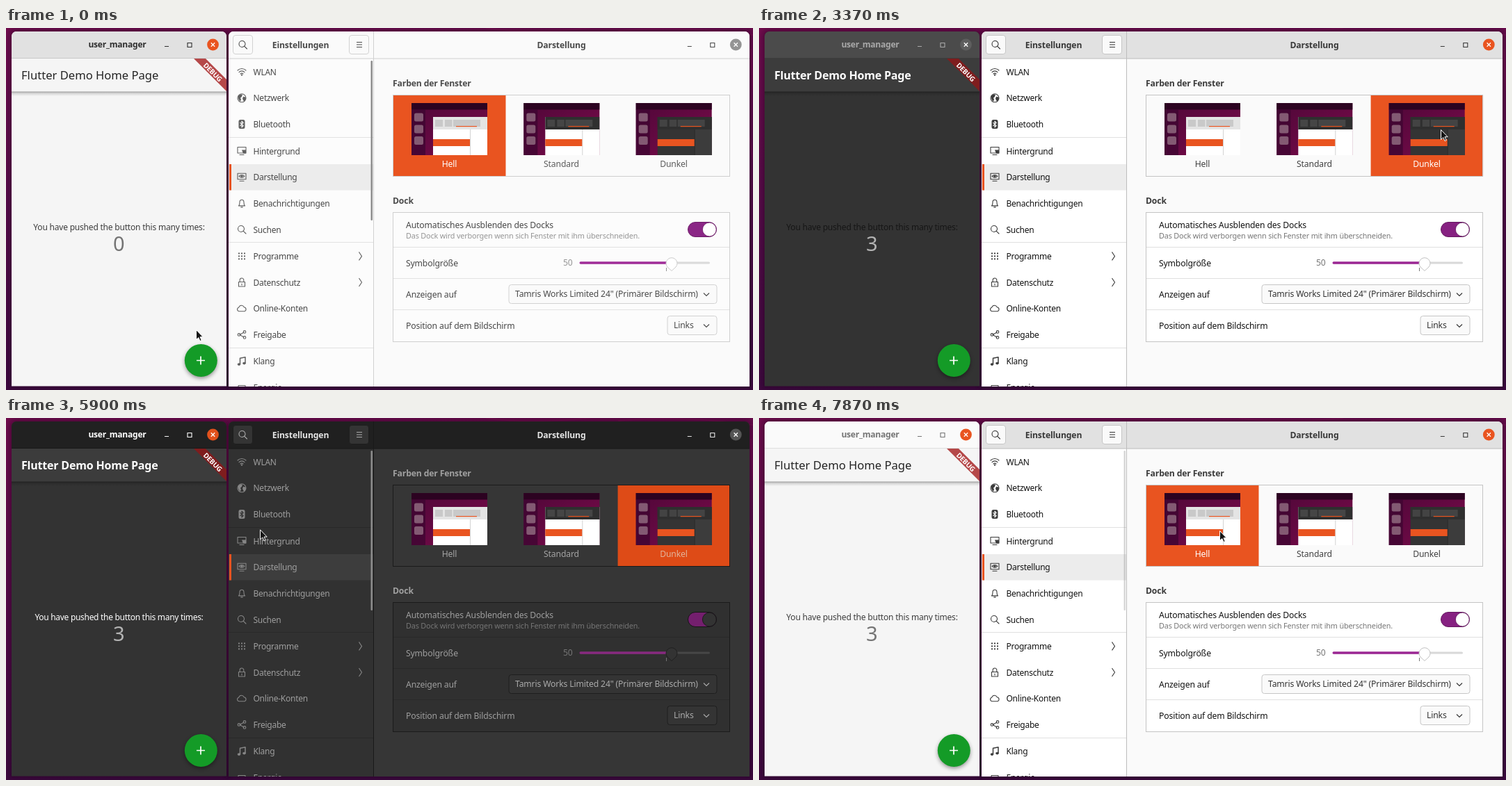
These frames come from a looping animation (1074 by 521 pixels, 8 s). An HTML page:

```html
<!DOCTYPE html>
<html lang="de">
<head>
<meta charset="utf-8">
<title>Darstellung</title>
<style>
html, body { margin: 0; width: 100%; height: 100%; overflow: hidden; background: #3f0a40; }
svg { display: block; width: 1074px; height: 521px; }
text { font: 12.2px "Noto Sans", "Open Sans", sans-serif; letter-spacing: -.15px; white-space: pre; }
.b { font-weight: 700; }
.small { font-size: 10.8px; }
.side { font-size: 12px; letter-spacing: -.25px; }
.push { font-size: 12px; letter-spacing: -.2px; }
.push.strong { font-weight: 500; letter-spacing: -.3px; }
.appL { font-size: 16.6px; font-weight: 500; letter-spacing: 0; }
.appD { font-size: 16px; font-weight: 700; letter-spacing: -.2px; }
.num { font-size: 29px; letter-spacing: 0; }
.tag { font-size: 10px; font-weight: 900; letter-spacing: -.2px; }
.mid { text-anchor: middle; }
.icon { fill: none; stroke: var(--ic); stroke-width: 1.1; stroke-linecap: round; stroke-linejoin: round; }
.icon .f { fill: var(--ic); stroke: none; }
</style>
</head>
<body>
<svg id="stage" viewBox="0 0 1074 521" xmlns="http://www.w3.org/2000/svg"></svg>
<script>
const LOOP = 8000;
const stage = document.getElementById('stage');

// ---------- drawing helpers ----------
const col = c => c.startsWith('--') ? `var(${c})` : c;
const rect = (x, y, w, h, fill, stroke, rx = 0, more = '') =>
  `<rect x="${x}" y="${y}" width="${w}" height="${h}" rx="${rx}" style="fill:${col(fill)};stroke:${col(stroke || 'none')}" ${more}/>`;
const text = (x, y, s, fill, cls = '', more = '') =>
  `<text x="${x}" y="${y}" class="${cls}" style="fill:${col(fill)}" ${more}>${s}</text>`;
const line = (d, stroke, w = 1, more = '') =>
  `<path d="${d}" style="fill:none;stroke:${col(stroke)};stroke-width:${w}" ${more}/>`;
const disc = (x, y, r, fill, more = '') =>
  `<circle cx="${x}" cy="${y}" r="${r}" style="fill:${col(fill)}" ${more}/>`;
const frame = (x, w, h) =>
  `M${x} ${5 + h}V12a7 7 0 0 1 7-7h${w - 14}a7 7 0 0 1 7 7V${5 + h}Z`;

const winButtons = (x, ink, fill) =>
  line(`M${x - 69.5} 26.5h6`, ink, 1.1) + line(`M${x - 36.5} 21.5h6v6h-6z`, ink, 1.1) +
  disc(x, 24, 8.4, fill) + line(`M${x - 2.7} 21.3l5.4 5.4m0-5.4l-5.4 5.4`, '#fff', 1.3);

// ---------- sidebar ----------
const icons = {
  wifi: '<path d="M-6-2a8.5 8.5 0 0 1 12 0M-4 .6a5.6 5.6 0 0 1 8 0M-2 3a3 3 0 0 1 4 0"/><circle class="f" cy="4.6" r="1.2"/>',
  globe: '<circle r="6"/><path class="f" d="M-5-3Q-2-6 1-5L0-2-2 0-1 2-2 5Q-6 2-5-3ZM2-2L6-1Q6 3 3 5L1 1Z"/>',
  blue: '<rect class="f" x="-4.5" y="-6.5" width="9" height="13" rx="2.5"/><path d="M-2.2-2.2l4.4 4.4L0 4.4v-8.8l2.2 2.2-4.4 4.4" style="stroke:var(--side)"/>',
  desk: '<path d="M-6-5.5H6v8.5H-6ZM-3 5.5H3"/><path class="f" d="M0-1.5h6v5H2z"/>',
  look: '<path d="M-6-5.5H6v8.5H-6ZM-3 5.5H3M-4-1.3Q0-5 4-1.3 0 2.2-4-1.3Z"/><circle class="f" cy="-1.3" r="1.5"/>',
  bell: '<path d="M-4.5 3.5Q-3 2-3-1.5a3 3.6 0 0 1 6 0Q3 2 4.5 3.5ZM-1.2 5.5h2.4"/>',
  find: '<circle cx="-1" cy="-1" r="4.5"/><path d="M2.3 2.3L6 6"/>',
  grid: [-4, 0, 4].map(y => [-4, 0, 4].map(x => `<circle class="f" cx="${x}" cy="${y}" r="1.1"/>`).join('')).join(''),
  lock: '<path d="M-4.5-.5h9v6.5h-9ZM-2.8-.5v-2.7a2.8 2.8 0 0 1 5.6 0v2.7M0 2v2"/>',
  cloud: '<path d="M-4 4a2.8 2.8 0 0 1-.3-5.5 4 4 0 0 1 7.5-.5A3.1 3.1 0 0 1 4 4Z"/>',
  share: '<path d="M-3 0L3-3.5M-3 0L3 3.5"/><circle cx="-4" r="1.8"/><circle cx="4" cy="-4" r="1.8"/><circle cx="4" cy="4" r="1.8"/>',
  note: '<path d="M-2.5 4v-8.5L5-6v8.5" stroke-width="1.5"/><ellipse class="f" cx="-4" cy="4.3" rx="2.3" ry="1.8"/><ellipse class="f" cx="3.5" cy="2.8" rx="2.3" ry="1.8"/>',
  power: '<path d="M-5-3H5v7H-5Z"/>'
};
const menu = [
  ['WLAN', 'wifi', 63], ['Netzwerk', 'globe', 100.8], ['Bluetooth', 'blue', 138.5],
  ['Hintergrund', 'desk', 177], ['Darstellung', 'look', 214.7], ['Benachrichtigungen', 'bell', 252.4],
  ['Suchen', 'find', 290], ['Programme', 'grid', 328.4], ['Datenschutz', 'lock', 366],
  ['Online-Konten', 'cloud', 403.7], ['Freigabe', 'share', 441.4], ['Klang', 'note', 479.8],
  ['Energie', 'power', 517.5]
];
const glyph = (name, x, y) => `<g class="icon" transform="translate(${x} ${y})">${icons[name]}</g>`;

const sidebar = () =>
  rect(320, 44, 208, 472, '--side') +
  rect(320, 196, 208, 37.5, '--row') + rect(321, 196, 3, 37.5, '#e95420') +
  [157.5, 308.5, 460.5].map(y => line(`M320 ${y}H528`, '--line')).join('') +
  menu.map(([s, icon, y]) => glyph(icon, 339, y) + text(355.5, y + 4.5, s, '--tx', 'side')).join('') +
  [328.4, 366].map(y => line(`M507.5 ${y - 6}l4 6-4 6`, '--ic', 1.1)).join('') +
  rect(524.5, 47, 2.5, 230, '--bar', '', 1.2, 'id="bar"');

// ---------- theme tiles ----------
function thumb(x, head, btn, body, pane, split) {
  const box = (dx, w) => rect(x + dx, 132, w, 10, btn);
  return rect(x, 108, 109, 75, 'url(#wall)') + rect(x, 108, 109, 9.5, '#2c0321') +
    rect(x, 117, 20, 66, '#3d0630', '', 0, 'opacity=".75"') +
    [122.5, 139.5, 156].map(y => rect(x + 4, y, 13, 12, '#835a73', '', 2.5)).join('') +
    rect(x + 31, 128, 78, 55, body) + rect(x + 84.5, 146, 24.5, 37, pane) +
    rect(x + 31, 128, 78, 18, head) + box(34, 11) + box(48, 10.5) + box(60, 39) +
    rect(x + 64, 141, 30, 1.2, '#e95420') +
    line(`M${x + 84.5} 146v37`, split) + rect(x + 31, 160, 53, 10, '#e95420');
}
const tiles = () =>
  rect(557, 97, 484, 116, '--main') +
  rect(557, 97, 161.5, 116, '--sel', '', 0, 'id="pick"') +
  rect(556.5, 96.5, 484, 117, 'none', '--bord') +
  thumb(583, '#e4e4e4', '#c9c9c9', '#ffffff', '#ffffff', '#d2d2d2') +
  thumb(744.3, '#2f2f2f', '#454545', '#ffffff', '#ffffff', '#d2d2d2') +
  thumb(905.7, '#2f2f2f', '#434343', '#343434', '#3c3c3c', '#2b2b2b') +
  text(637.5, 200, 'Hell', '--tile0', 'mid') + text(798.5, 200, 'Standard', '--tile1', 'mid') +
  text(960, 200, 'Dunkel', '--tile2', 'mid');

const dropDown = (x, y, w, s) =>
  rect(x + .5, y + .5, w - 1, 27, '--btn', '--btnb', 3.5) +
  text(x + 9.5, y + 18.3, s, '--btx') +
  line(`M1003 ${y + 12.5}l4 4 4-4`, '--btx', 1.1);

const dock = () =>
  rect(556.5, 265.5, 484, 186, '--card', '--bord') +
  [315.5, 360.5, 405.5].map(y => line(`M557 ${y}H1040`, '--line')).join('') +
  text(575, 288, 'Automatisches Ausblenden des Docks', '--tx') +
  text(575, 303, 'Das Dock wird verborgen wenn sich Fenster mit ihm überschneiden.', '--sub', 'small') +
  rect(980.5, 279.5, 41, 21, '--sw', '--swb', 10.5) +
  disc(1011.3, 290, 9.9, '--knob', 'stroke="var(--swb)" stroke-width=".8"') +
  text(575, 343, 'Symbolgröße', '--tx') + text(801, 342.3, '50', '--sub') +
  rect(825, 336.5, 187, 3, '--track', '', 1.5) + rect(824.5, 336.3, 132, 3.4, '--slide', '', 1.7) +
  line('M949.5 345v5', '--sub') +
  `<path d="M957 349.5l-6-5.5a8 8 0 1 1 12 0Z" style="fill:var(--grip);stroke:var(--gripb)"/>` +
  text(575, 388, 'Anzeigen auf', '--tx') +
  dropDown(722.5, 369, 300, 'Tamris Works Limited 24&quot; (Primärer Bildschirm)') +
  text(575, 433, 'Position auf dem Bildschirm', '--tx') +
  dropDown(950.5, 414, 72, 'Links');

const settings = () =>
  rect(320, 5, 749, 511, '--main') + sidebar() +
  rect(320, 5, 749, 39, '--title') + line('M320 44H1069', '--edge') + line('M528.5 5V516', '--edge') +
  rect(326.5, 10.5, 28, 27, '--btn', '--btnb', 3.5) + rect(493.5, 10.5, 28, 27, '--btn', '--btnb', 3.5) +
  `<g class="icon" style="stroke:var(--btx)" transform="translate(340.5 24)">${icons.find}</g>` +
  line('M504 20.5h8M504 24h8M504 27.5h8', '--btx', 1.1) +
  text(423.5, 28.5, 'Einstellungen', '--ttl', 'b mid') + text(798.5, 28.5, 'Darstellung', '--ttl', 'b mid') +
  winButtons(1049.3, '--ttl', '--close') +
  text(556, 83.5, 'Farben der Fenster', '--head', 'b') + tiles() +
  text(556, 252.5, 'Dock', '--head', 'b') + dock();

// ---------- counter app ----------
const counter = () =>
  rect(8, 5, 309, 511, '--lbody') + rect(8, 91, 309, 7, 'url(#fall)') + rect(8, 44, 309, 47.5, '--lapp') +
  text(22, 74, 'Flutter Demo Home Page', '--lhead', 'appL', 'id="appL"') +
  text(22, 74, 'Flutter Demo Home Page', '--lhead', 'appD', 'id="appD"') +
  `<path d="M270 44h17l30 30v17z" style="fill:var(--flag)"/>` +
  text(0, 3.6, 'DEBUG', '#fff', 'tag mid', 'transform="translate(297.3 63.5) rotate(45)"') +
  rect(8, 5, 309, 39, '--ltitle') + line('M8 43.5H317', '--ledge') +
  text(160, 28.3, 'user_manager', '--lttl', 'b mid push') +
  winButtons(297.5, '--lttl', '--lclose') +
  text(162.5, 291, 'You have pushed the button this many times:', '--lmsg', 'mid push', 'id="msg"') +
  text(162.3, 321, '0', '--lnum', 'mid num', 'id="num"') +
  disc(280.3, 481, 23, '#000', 'filter="url(#soft)" id="fabShade"') +
  disc(280.3, 478.5, 23.5, '#149b27') + disc(280.3, 478.5, 10, '#fff', 'id="splash"') +
  line('M274 478.5h12M280 472.5v12', '#fff', 1.7);

stage.innerHTML = `
<defs>
  <linearGradient id="desk" x2=".15" y2="1"><stop stop-color="#6f0c4c"/><stop offset=".5" stop-color="#560b48"/><stop offset="1" stop-color="#3d093e"/></linearGradient>
  <linearGradient id="wall" x2="1" y2="1"><stop stop-color="#4f0738"/><stop offset=".5" stop-color="#650942"/><stop offset="1" stop-color="#7d0b4a"/></linearGradient>
  <linearGradient id="fall" x2="0" y2="1"><stop stop-opacity=".42"/><stop offset=".4" stop-opacity=".14"/><stop offset="1" stop-opacity="0"/></linearGradient>
  <filter id="soft" x="-30%" y="-30%" width="160%" height="160%"><feGaussianBlur stdDeviation="3"/></filter>
  <clipPath id="left"><path d="${frame(8, 309, 510.5)}"/></clipPath>
  <clipPath id="right"><path d="${frame(320, 749, 511)}"/></clipPath>
</defs>
${rect(0, 0, 1074, 521, 'url(#desk)')}
${line('M690 0q60 9 150 0M880 4q90-8 194 6M1071 30l3 60M1068 150l6 40', '#8a1456', 1.5, 'opacity=".4"')}
${line(frame(8, 309, 510.5), '#17021a', 4, 'filter="url(#soft)" opacity=".6"')}
${line(frame(320, 749, 511), '#17021a', 4, 'filter="url(#soft)" opacity=".6"')}
<g clip-path="url(#left)">${counter()}</g>
<g clip-path="url(#right)">${settings()}</g>
<path id="mouse" d="M.5 .5V14.5L3.8 11.6 6 16.5 8.2 15.5 6 10.7H10.2Z" fill="#141414" stroke="#fff" stroke-width="1"/>`;

// ---------- colours: light, light unfocused, dark, dark unfocused ----------
const shell = {
  title: ['#e1e1e1', '#fafafa', '#252525', '#202020'],
  edge: ['#bdbdbd', '#d0d0d0', '#171717', '#191919'],
  side: ['#ffffff', '#fcfcfc', '#282828', '#313131'],
  main: ['#fafafa', '#fafafa', '#2d2d2d', '#363636'],
  card: ['#ffffff', '#fcfcfc', '#292929', '#303030'],
  line: ['#e0e0e0', '#e2e2e2', '#232323', '#292929'],
  bord: ['#c4c4c4', '#cfcfcf', '#191919', '#1b1b1b'],
  row: ['#ececec', '#ececec', '#393939', '#3d3d3d'],
  btn: ['#fafafa', '#fafafa', '#363636', '#343434'],
  btnb: ['#c6c6c6', '#d2d2d2', '#1c1c1c', '#1e1e1e'],
  ttl: ['#383838', '#4a4a4a', '#ffffff', '#e4e4e4'],
  head: ['#3b3b3b', '#4c4c4c', '#ffffff', '#a0a0a0'],
  tile: ['#404040', '#5c5c5c', '#ffffff', '#a4a4a4'],
  on: ['#ffffff', '#ffffff', '#ffffff', '#e3b49c'],
  sel: ['#e95420', '#e95420', '#de4b17', '#de4b17'],
  close: ['#e95420', '#949494', '#e2511c', '#555555']
};
const bodyInk = {
  tx: ['#121212', '#484848', '#ffffff', '#9e9e9e'],
  sub: ['#777777', '#959595', '#a2a2a2', '#757575'],
  btx: ['#333333', '#4a4a4a', '#f4f4f4', '#ababab'],
  ic: ['#3c3c3c', '#606060', '#d6d6d6', '#868686'],
  bar: ['#8e8e8e', '#8e8e8e', '#9a9a9a', '#8c8c8c'],
  grip: ['#ffffff', '#ffffff', '#b3aeaa', '#333333'],
  gripb: ['#c2c2c2', '#cdcdcd', '#222222', '#202020'],
  track: ['#d8d8d8', '#dadada', '#4a4a4a', '#474747'],
  slide: ['#9c2794', '#a12d99', '#87297f', '#87297f']
};
const toggle = {
  sw: ['#862181', '#8b2786', '#741f6e', '#741f6e'],
  swb: ['#64185f', '#6d1d68', '#151515', '#151515'],
  knob: ['#ffffff', '#ffffff', '#b3aeaa', '#333333']
};
const appBar = {
  ltitle: ['#e1e1e1', '#fafafa', '#212121', '#2c2c2c'],
  ledge: ['#c8c8c8', '#dedede', '#181818', '#202020'],
  lttl: ['#2f2f2f', '#757575', '#ffffff', '#b2b2b2']
};
const appBody = {
  lbody: ['#f5f5f5', '#333333'], lapp: ['#f5f5f5', '#3c3c3c'], lhead: ['#242424', '#ffffff'],
  lnum: ['#747474', '#b4b4b4'], flag: ['#b54849', '#7f1d1e']
};

// ---------- motion: [time, value...], a repeated time is a hard cut ----------
const tracks = {
  appDark: [[0, 0], [3370, 0], [3370, 1], [7670, 1], [7670, 0]],
  barDark: [[0, 0], [3370, 0], [3370, .85], [3770, 1], [7670, 1], [7670, .4], [7870, .4], [7870, 0]],
  appBlur: [[0, 0], [2400, 0], [2400, 1], [5020, 1], [5200, 0], [7670, 0], [7670, 1]],
  appClose: [[0, 0], [2400, 0], [2400, 1], [5020, 1], [5200, 0]],
  msg: [[0, 0], [3430, 0], [3700, 1], [7670, 1], [7670, 0]],
  dark: [[0, 0], [3430, 0], [3770, 1], [7870, 1], [7870, 0]],
  blur: [[0, 1], [2400, 1], [2400, 0], [5080, 0], [5230, .5], [5400, 1], [6870, 1], [6870, 0]],
  bodyBlur: [[0, 1], [2400, 1], [2400, 0], [5080, 0], [5230, .5], [5400, 1], [7670, 1], [7670, 0]],
  knobBlur: [[0, 1], [2400, 1], [2400, 0], [5230, 0], [5700, 1], [7670, 1], [7670, 0]],
  bar: [[0, 1], [330, 1], [330, .7], [2400, .7], [2400, 0], [4900, 0], [5230, .6], [5500, 1], [7870, 1], [7870, .35]],
  pick: [[0, 0], [3370, 0], [3370, 2], [7870, 2], [7870, 0]],
  shade: [[0, .45], [330, .45], [570, .55], [2400, .55], [2400, .45]]
};
const path = [
  [0, 273, 434], [330, 273, 434], [330, 279, 462], [2400, 279, 462], [2400, 845, 70], [2600, 980, 146],
  [4700, 980, 146], [4700, 960, 145], [4870, 960, 145], [5200, 189, 160], [5700, 189, 160],
  [6200, 685, 161], [6470, 685, 161], [6600, 662, 162]
];

const ease = p => p * p * (3 - 2 * p);
function at(track, t, curve = p => p) {
  let i = track.length - 1;
  while (i && track[i][0] > t) i--;
  const a = track[i], b = track[i + 1];
  if (!b) return a.slice(1);
  const p = curve((t - a[0]) / (b[0] - a[0]));
  return a.slice(1).map((v, k) => v + (b[k + 1] - v) * p);
}
const rgb = h => [1, 3, 5].map(i => parseInt(h.slice(i, i + 2), 16));
const mix = (a, b, p) => a.map((v, i) => v + (b[i] - v) * p);
const css = c => `rgb(${c.map(Math.round)})`;
function shade(set, dark, blur) {
  const [a, b, c, d] = set.map(rgb);
  return css(mix(mix(a, b, blur), mix(c, d, blur), dark));
}
const put = (name, value) => stage.style.setProperty('--' + name, value);
const paint = (sets, dark, blur) => {
  for (const k in sets) put(k, shade(sets[k], dark, blur));
};
const $ = id => document.getElementById(id);

function draw(t) {
  const s = {};
  for (const k in tracks) s[k] = at(tracks[k], t)[0];

  paint(shell, s.dark, s.blur);
  paint(bodyInk, s.dark, s.bodyBlur);
  paint(toggle, s.dark, s.knobBlur);
  paint(appBar, s.barDark, s.appBlur);
  put('lclose', shade(shell.close, s.barDark, s.appClose));
  for (const k in appBody) put(k, css(mix(...appBody[k].map(rgb), s.appDark)));
  put('lmsg', css(mix(rgb(s.appDark ? '#161616' : '#3d3d3d'), [255, 255, 255], s.msg)));
  for (let i = 0; i < 3; i++) put('tile' + i, `var(--${i === s.pick ? 'on' : 'tile'})`);

  $('pick').setAttribute('x', 557 + s.pick * 161.3);
  $('bar').style.opacity = s.bar;
  $('appL').style.display = s.appDark ? 'none' : '';
  $('appD').style.display = s.appDark ? '' : 'none';
  $('msg').classList.toggle('strong', s.msg > .5);
  $('num').textContent = [820, 930, 1070].filter(n => t >= n).length;

  const p = (t - 770) / 300, live = p >= 0 && p < 1;
  $('splash').setAttribute('r', live ? 8 + 15.5 * p : 0);
  $('splash').style.opacity = live ? .25 * (1 - p) : 0;
  $('fabShade').style.opacity = s.shade;

  const [x, y] = at(path, t, ease);
  $('mouse').setAttribute('transform', `translate(${x.toFixed(2)} ${y.toFixed(2)})`);
  $('mouse').style.display = t >= 30 && t < 330 ? 'none' : '';
}

const start = performance.now();
function tick() {
  draw((performance.now() - start) % LOOP);
  requestAnimationFrame(tick);
}
tick();
</script>
</body>
</html>
```
